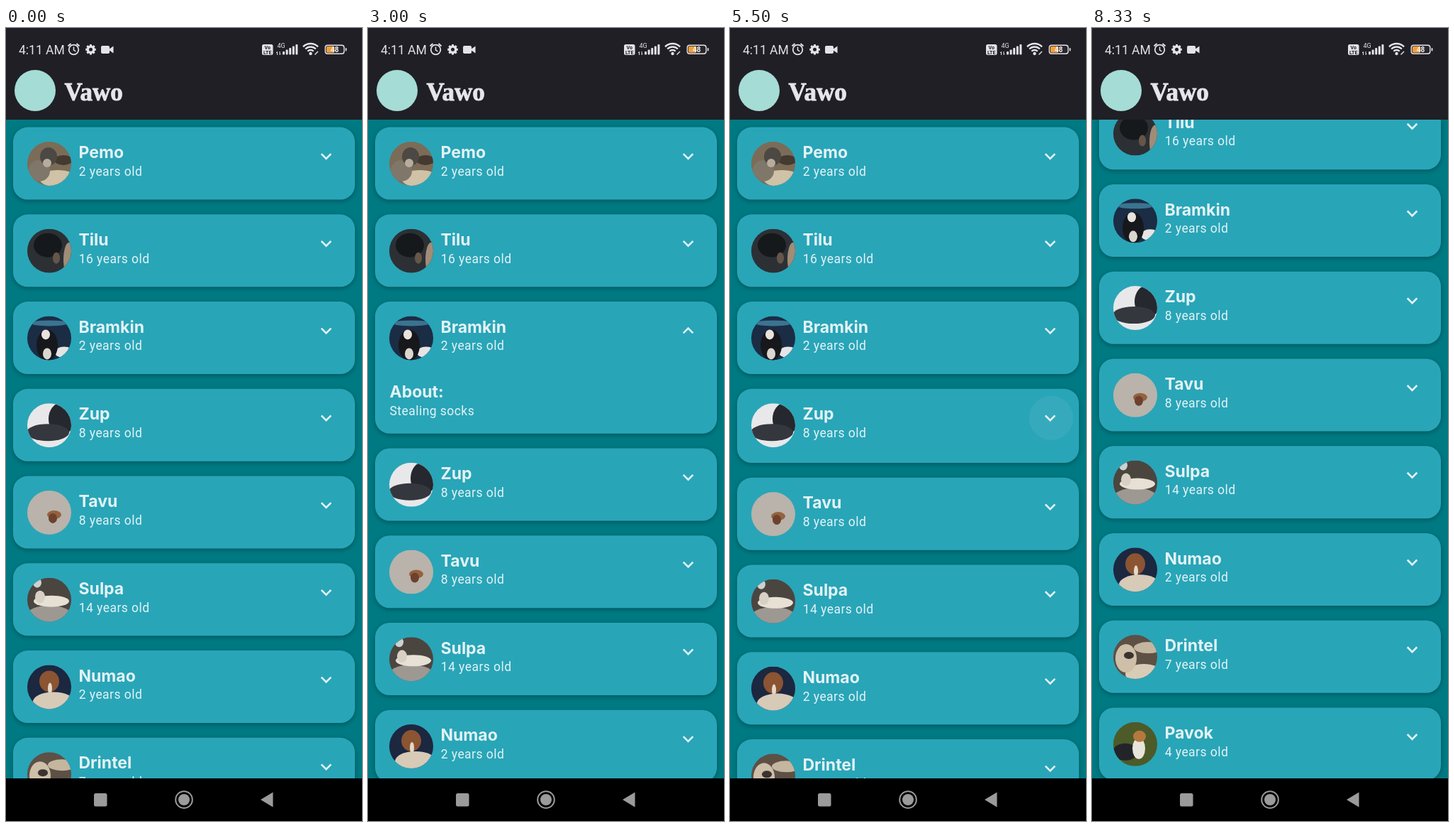
Write an HTML page with a canvas that moves like this. It is 502 by 1116 pixels and loops after 8.58 s.

```html
<!DOCTYPE html>
<html lang="en">
<head>
<meta charset="utf-8">
<title>Dog list</title>
<style>
  html, body { margin: 0; width: 100%; height: 100%; overflow: hidden; background: #000; }
  canvas { display: block; }
</style>
</head>
<body>
<canvas id="stage" width="502" height="1116"></canvas>
<script>
const ctx = document.getElementById('stage').getContext('2d');
const W = 502, H = 1116, BAR = 129, NAV = 1056;
const LOOP = 8580, STEP = 250 / 3, LAST_STEP = 100;
const FIRST = 139.6, PITCH = 122.75, CARD = 102, RADIUS = 20.5, HOBBY = 83.6;
const MAX_SCROLL = 178, BOUNCE_SCROLL = 12.9;
const INK = '#e3f3f5', ICON = '#e4e3e8', GREY = '#9b9b9b';
const BOLD = '700 23px Inter, sans-serif', BODY = '17.5px Roboto, sans-serif';

// Avatar blobs: colour, centre x, centre y, radius x, radius y
const dogs = [
  { name: 'Pemo', age: 2, bg: '#7b6c58', art: [
    ['#453a30', 20, -5, 13, 7], ['#cfc2a6', 12, 21, 26, 12],
    ['#7f776a', -14, 10, 15, 15], ['#4c4843', -1, -10, 12, 13], ['#b8ad9d', -3, -1, 6, 6]] },
  { name: 'Tilu', age: 16, bg: '#2c3034', art: [
    ['#a18c77', 28, 12, 8, 24], ['#15191c', -2, -8, 20, 17], ['#65564a', 10, 10, 5, 8]] },
  { name: 'Bramkin', age: 2, bg: '#1b2c45', hobby: 'Stealing socks', art: [
    ['#3b7490', 0, -21, 26, 4], ['#e6e4e4', 21, 20, 13, 8],
    ['#17181c', -3, 10, 15, 22], ['#e9e3dc', -5, -5, 6, 7], ['#dcd6d0', -3, 22, 6, 8]] },
  { name: 'Zup', age: 8, bg: '#e8e8ea', hobby: 'Meeting new animals', art: [
    ['#25282e', 17, -9, 18, 23], ['#34383e', -2, 10, 30, 12]] },
  { name: 'Tavu', age: 8, bg: '#b9b3ab', art: [
    ['#94623f', 7, 3, 10, 6], ['#6d412d', 5, 8, 6, 7]] },
  { name: 'Sulpa', age: 14, bg: '#4b453f', hobby: 'Chasing sea foam', art: [
    ['#cdd1d0', -17, -24, 6, 7], ['#9d9892', 0, 22, 32, 14],
    ['#e6e0d5', 3, 2, 25, 8], ['#d8d0c4', -13, -4, 7, 9]] },
  { name: 'Numao', age: 2, bg: '#1c2740', art: [
    ['#8b5432', 0, -8, 14, 15], ['#e5d8c7', 1, 2, 3, 8], ['#d7cab7', 6, 21, 29, 14]] },
  { name: 'Drintel', age: 7, bg: '#5d5045', art: [
    ['#c4b69f', 18, -13, 20, 8], ['#d9ccb7', 12, 24, 26, 14],
    ['#cdbfa8', -13, 2, 15, 20], ['#3b3330', -9, -2, 7, 5]] },
  { name: 'Pavok', age: 4, bg: '#4c5b28', art: [
    ['#23242a', -14, 11, 18, 12], ['#e9e4da', 5, 6, 9, 15], ['#b5793f', 6, -11, 9, 8]] },
];

const taps = [
  { dog: 2, open: 2450, close: 3430 },
  { dog: 3, open: 4371, close: 5313 },
  { dog: 5, open: 6698, close: 7640 },
];

const clamp = (v, lo = 0, hi = 1) => Math.min(hi, Math.max(lo, v));

// Unit step response of a spring with damping ratio 0.5 and stiffness 1500
function spring(ms) {
  if (ms <= 0) return 0;
  const s = ms / 1000, w = Math.sqrt(1500), wd = w * Math.sqrt(0.75);
  return 1 - Math.exp(-0.5 * w * s) * (Math.cos(wd * s) + Math.sin(wd * s) / Math.sqrt(3));
}

function extraHeight(tap, t) {
  return HOBBY * (t < tap.close ? spring(t - tap.open) : 1 - spring(t - tap.close));
}

function scrollAt(t) {
  const p = clamp((t - 5760) / 560);
  const down = MAX_SCROLL * (1 - Math.pow(1 - p, 3));
  // The shorter list pulls the scroll back while the last card bounces shut
  const since = t - taps[2].close;
  if (since < 0) return down;
  const under = -HOBBY * (1 - spring(Math.min(since, 94)));
  return down - clamp(under, 0, BOUNCE_SCROLL);
}

function text(str, x, y, font, color = INK, spacing = 0, align = 'left') {
  ctx.font = font;
  ctx.letterSpacing = spacing + 'px';
  ctx.textAlign = align;
  ctx.fillStyle = color;
  ctx.fillText(str, x, y);
}

function box(x, y, w, h, r, color) {
  ctx.beginPath();
  ctx.roundRect(x, y, w, h, r);
  ctx.fillStyle = color;
  ctx.fill();
}

function disc(x, y, rx, color, ry = rx) {
  ctx.beginPath();
  ctx.ellipse(x, y, rx, ry, 0, 0, 7);
  ctx.fillStyle = color;
  ctx.fill();
}

function ring(x, y, r, width, color, from = 0, to = 2 * Math.PI) {
  ctx.beginPath();
  ctx.arc(x, y, r, from, to);
  ctx.lineWidth = width;
  ctx.strokeStyle = color;
  ctx.stroke();
}

function line(points, width, color) {
  ctx.beginPath();
  points.forEach(([x, y]) => ctx.lineTo(x, y));
  ctx.lineWidth = width;
  ctx.strokeStyle = color;
  ctx.stroke();
}

function shape(points, color) {
  ctx.beginPath();
  points.forEach(([x, y]) => ctx.lineTo(x, y));
  ctx.fillStyle = color;
  ctx.fill();
}

function avatar(dog, x, y) {
  ctx.save();
  ctx.beginPath();
  ctx.arc(x, y, 31, 0, 7);
  ctx.clip();
  ctx.fillStyle = dog.bg;
  ctx.fillRect(x - 31, y - 31, 62, 62);
  for (const [color, dx, dy, rx, ry] of dog.art) disc(x + dx, y + dy, rx, color, ry);
  ctx.restore();
}

function ripple(since, x, y) {
  if (since < -90 || since > 340) return;
  const grow = clamp((since + 90) / 190);
  const fade = 1 - clamp((since - 190) / 150);
  disc(x, y, 10 + 21 * grow, `rgba(255,255,255,${0.06 * fade})`);
}

function card(dog, y, height, open, tap, t) {
  ctx.save();
  ctx.shadowColor = 'rgba(0,30,36,0.38)';
  ctx.shadowBlur = 6;
  ctx.shadowOffsetY = 2;
  box(10, y, 482, height, RADIUS, '#29a5b8');
  ctx.restore();

  ctx.save();
  ctx.beginPath();
  ctx.roundRect(10, y, 482, height, RADIUS);
  ctx.clip();
  avatar(dog, 61, y + 51.3);
  text(dog.name, 102.5, y + 43.6, BOLD);
  text(dog.age + ' years old', 102.7, y + 68.2, BODY, INK, 0.45);
  if (tap) {
    ripple(t - tap.open, 454, y + 41);
    ripple(t - tap.close, 453, y + 41);
  }
  const cy = y + 40.9, d = open ? -3.4 : 3.4;
  line([[444.7, cy - d], [451.5, cy + d], [458.3, cy - d]], 2.6, INK);
  if (open) {
    text('About:', 30.5, y + 135.3, BOLD);
    text(dog.hobby, 30.5, y + 160.2, BODY, INK, 0.45);
  }
  ctx.restore();
}

function list(t) {
  ctx.fillStyle = '#007a82';
  ctx.fillRect(0, BAR, W, NAV - BAR);
  let y = FIRST - scrollAt(t);
  dogs.forEach((dog, i) => {
    const tap = taps.find(p => p.dog === i);
    const extra = tap ? extraHeight(tap, t) : 0;
    const open = !!tap && t >= tap.open && t < tap.close;
    if (y < NAV) card(dog, y, CARD + extra, open, tap, t);
    y += PITCH + extra;
  });
}

function statusLeft() {
  text('4:11 AM', 18, 37, '17.5px Roboto, sans-serif', ICON);
  ring(95.5, 30.5, 6.8, 1.8, ICON);
  line([[95.5, 26.5], [95.5, 31], [98.5, 33]], 1.5, ICON);
  line([[87.5, 25.5], [91.5, 22]], 2, ICON);
  line([[99.5, 22], [103.5, 25.5]], 2, ICON);

  ring(119.5, 30.3, 4.2, 3.4, ICON);
  for (let i = 0; i < 8; i++) {
    const a = i * Math.PI / 4, c = Math.cos(a), s = Math.sin(a);
    line([[119.5 + 5 * c, 30.3 + 5 * s], [119.5 + 7.3 * c, 30.3 + 7.3 * s]], 3, ICON);
  }
  box(134, 25, 12, 11, 2, ICON);
  shape([[145, 30], [151.5, 25.5], [151.5, 35.5], [145, 31]], ICON);
}

function statusRight() {
  box(361, 23, 15.5, 15, 2.5, ICON);
  text('Vo', 368.7, 30, '700 7px Roboto, sans-serif', '#201f26', 0, 'center');
  text('LTE', 368.7, 36.5, '700 7px Roboto, sans-serif', '#201f26', 0, 'center');
  text('4G', 382.5, 28, '9px Roboto, sans-serif', ICON);
  line([[382.5, 38], [382.5, 33.5], [381, 35]], 1, ICON);
  line([[386, 33], [386, 37.5], [387.5, 36]], 1, ICON);
  for (let i = 0; i < 5; i++) {
    const h = 4.5 + i * 2.5;
    box(390 + i * 4.6, 37.5 - h, 3, h, 1, ICON);
  }
  for (const r of [15, 10.5, 6]) ring(429.5, 37, r, 2.3, ICON, -2.35, -0.79);
  disc(429.5, 36, 2.2, ICON);
  line([[435.5, 37.5], [440, 33]], 1.4, ICON);

  box(449.5, 23.5, 28, 13.5, 4, ICON);
  box(450.9, 24.9, 25.2, 10.7, 3, '#29272d');
  box(451.8, 25.8, 11.5, 8.9, 2, '#f0a03c');
  box(478.6, 28, 1.8, 4.5, 1, ICON);
  text('48', 463.4, 34, '700 10px Roboto, sans-serif', '#f4f2f2', 0, 'center');
}

function header() {
  ctx.fillStyle = '#201f25';
  ctx.fillRect(0, 0, W, BAR);
  statusLeft();
  statusRight();
  disc(41, 88, 29, '#a5dcd5');
  text('Vawo', 82.5, 102, '700 35px "Liberation Serif", serif', '#e6e5ea');
  ctx.lineWidth = 0.9;
  ctx.strokeStyle = '#e6e5ea';
  ctx.strokeText('Vawo', 82.5, 102);
}

function navBar() {
  ctx.fillStyle = '#000';
  ctx.fillRect(0, NAV, W, H - NAV);
  box(124, 1077, 18.5, 18.5, 2.5, GREY);
  ring(251, 1086, 11.8, 2, GREY);
  disc(251, 1086, 8, GREY);
  shape([[359, 1086], [376.5, 1075.5], [376.5, 1096.5]], GREY);
}

const start = performance.now();
function draw() {
  const now = (performance.now() - start) % LOOP;
  // Motion advances twelve times a second and rests on the last pose
  const t = Math.min(LAST_STEP, Math.floor((now + 5) / STEP)) * STEP;
  list(t);
  header();
  navBar();
  requestAnimationFrame(draw);
}
draw();
</script>
</body>
</html>
```
